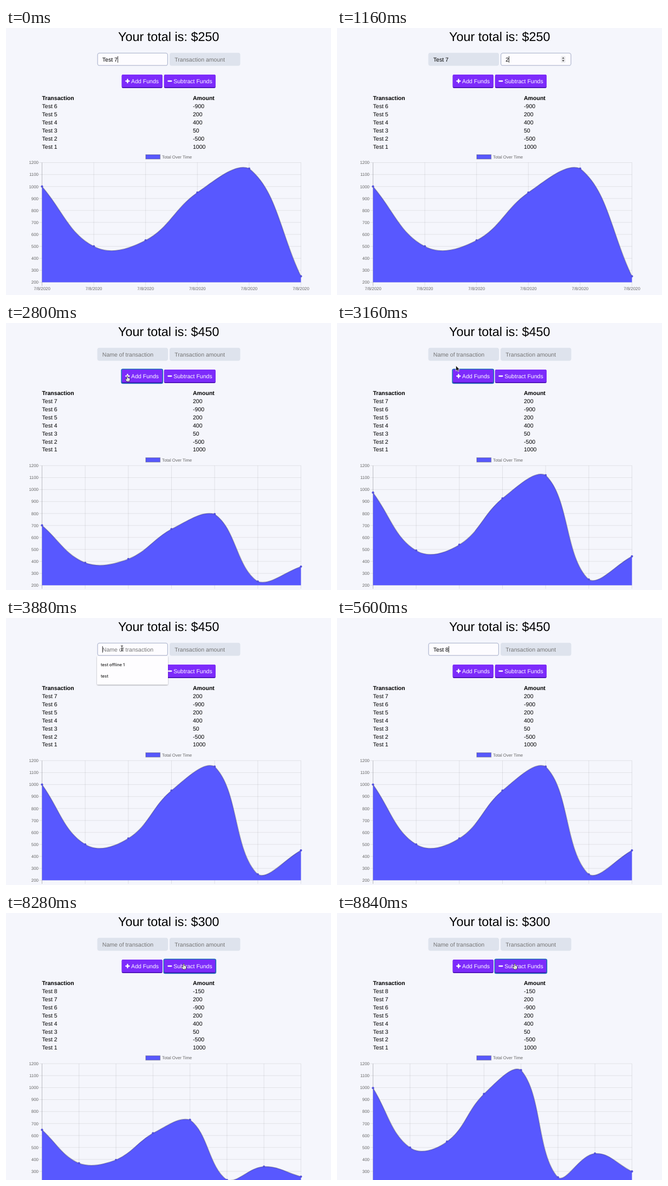
An HTML page for the animation above (8.88 s loop, 600 by 493 pixels).

```html
<!DOCTYPE html>
<html lang="en">
<head>
<meta charset="utf-8">
<title>Budget tracker</title>
<style>
  html, body { margin: 0; width: 100%; height: 100%; overflow: hidden; background: #f5f6fc; }
  svg { display: block; width: 600px; height: 493px; }
  text { font: 10.55px "Liberation Sans", Arial, sans-serif; fill: #000; white-space: pre; text-rendering: geometricPrecision; }
  .title { font-size: 23.4px; }
  .bold { font-weight: bold; }
  .hint { fill: #757575; }
  .light { fill: #fff; }
  .tick { font-size: 7.9px; fill: #666; }
  .option { font: 500 7.7px Inter, sans-serif; fill: #222; }
</style>
</head>
<body>
<svg id="stage" viewBox="0 0 600 493">
  <defs>
    <filter id="shadow" x="-10%" y="-15%" width="120%" height="140%">
      <feDropShadow dx="0" dy="1" stdDeviation="1.3" flood-opacity=".35"/>
    </filter>
  </defs>
  <g id="scene"></g>
</svg>
<script>
const LOOP = 8880;
const ROW = 14.85;
const PLOT = { left: 66.5, right: 544.5, top: 248.5, height: 221 };
const BLUE = '#5858ff';
const EDGE = 'rgba(50,50,50,.27)';
const amounts = [1000, -500, 50, 400, 200, -900, 200, -150];

// time, focused control, name text, amount text
const inputs = [
  [0, 'name', 'Test 7', ''], [220, 'amount', 'Test 7', ''],
  [920, 'amount', 'Test 7', '2'], [1320, 'amount', 'Test 7', '20'],
  [1520, 'amount', 'Test 7', '200'], [2560, 'add', '', ''],
  [3640, 'name', '', ''], [4240, 'name', 'T', ''],
  [4400, 'name', 'Te', ''], [4520, 'name', 'Tes', ''],
  [4680, 'name', 'Test', ''], [4840, 'name', 'Test ', ''],
  [5280, 'name', 'Test 8', ''], [5960, 'amount', 'Test 8', ''],
  [6600, 'amount', 'Test 8', '1'], [6800, 'amount', 'Test 8', '15'],
  [6980, 'amount', 'Test 8', '150'], [8070, 'subtract', '', '']
];

// time, number of transactions, start of chart growth
const ledgers = [[0, 6, -2000], [2560, 7, 2583], [8070, 8, 8096]];

// time, x, y
const pointerTracks = [
  { until: 4240, stops: [[1920, 214, 56], [2280, 224, 97.5], [2880, 224, 97.5], [3480, 214, 56]] },
  { until: LOOP, stops: [[7480, 214, 56], [7960, 328, 93.5]] }
];

const scene = document.getElementById('scene');
const pen = document.createElement('canvas').getContext('2d');
pen.font = '10.55px "Liberation Sans", Arial, sans-serif';

const latest = (list, t) => list.filter(item => item[0] <= t).pop();
const mix = (a, b, k) => a + (b - a) * k;
const clamp = (v, lo, hi) => Math.min(hi, Math.max(lo, v));

const text = (x, y, str, cls = '', anchor = 'start') =>
  `<text x="${x}" y="${y}" class="${cls}" text-anchor="${anchor}">${str}</text>`;
const rect = (x, y, w, h, fill, extra = '') =>
  `<rect x="${x}" y="${y}" width="${w}" height="${h}" fill="${fill}" ${extra}/>`;
const path = (d, fill, extra = '') => `<path d="${d}" fill="${fill}" ${extra}/>`;

function field(x, value, hint, focused, caretOn) {
  const start = x + 9.3;
  let out = focused
    ? rect(x + .6, 46.4, 129.3, 22.8, '#fdfcff', 'rx="3.5" stroke="#b4bbd2" stroke-width="1.3"')
    : rect(x, 45.8, 130.5, 24, '#dee3ed', 'rx="4"');
  out += text(start, 61.5, value || hint, value ? '' : 'hint');
  if (focused && caretOn)
    out += rect(start + pen.measureText(value).width, 52, .8, 12, '#000');
  return out;
}

function spinner() {
  return rect(413.5, 51.8, 8.2, 12.2, '#e9e9ec', 'rx="1.6"') +
    path('M415.5 56.6l2.1-2.7 2.1 2.7zM415.5 59.3l2.1 2.7 2.1-2.7z', '#444');
}

function button(x, width, label, focused, icon) {
  const ring = focused
    ? rect(x - .6, 85.3, width + 1.2, 26.2, 'none', 'rx="2.5" stroke="#1668b8" stroke-width="1.5"') : '';
  return rect(x, 86, width, 25, '#4a12b4', 'rx="2.5"') +
    rect(x, 86, width, 23.3, '#7d2bfb', 'rx="2.5"') + ring +
    path(icon, 'none', 'stroke="#fff" stroke-width="2.3" stroke-linecap="round"') +
    text(x + 17.4, 102, label, 'light');
}

function dropdown(typed) {
  const options = ['test offline 1', 'test'].filter(o => o.startsWith(typed.toLowerCase()));
  if (!options.length) return '';
  return rect(168, 70, 131, 10.6 + 21.2 * options.length, '#fefdff', 'rx="2" filter="url(#shadow)"') +
    options.map((o, i) => text(175, 89 + 21.2 * i, o, 'option')).join('');
}

function table(count) {
  let out = text(66.5, 133.4, 'Transaction', 'bold') + text(345, 133.4, 'Amount', 'bold');
  for (let i = 0; i < count; i++) {
    const y = 133.4 + ROW * (count - i);
    out += text(66.5, y, `Test ${i + 1}`) + text(345, y, amounts[i]);
  }
  return out;
}

// Control points of a cardinal spline with tension 0.4, kept inside the plot
function controls(points, top, base) {
  return points.map((p, i) => {
    const a = points[i - 1] || p, b = points[i + 1] || p;
    const before = Math.hypot(p.x - a.x, p.y - a.y);
    const after = Math.hypot(b.x - p.x, b.y - p.y);
    const handle = k => ({
      x: clamp(p.x + k * (b.x - a.x), PLOT.left, PLOT.right),
      y: clamp(p.y + k * (b.y - a.y), top, base)
    });
    const unit = .4 / (before + after);
    return [handle(-unit * before), handle(unit * after)];
  });
}

function chart(count, grown) {
  const top = PLOT.top + ROW * (count - 6), base = top + PLOT.height;
  const step = (PLOT.right - PLOT.left) / (count - 1);
  let total = 0, grid = '', labels = '';

  for (let v = 200; v <= 1200; v += 100) {
    const y = base - (v - 200) / 1000 * PLOT.height;
    grid += `M${PLOT.left - 6.5} ${y}H${PLOT.right}`;
    labels += text(60, y + 2.8, v, 'tick', 'end');
  }
  const final = amounts.slice(0, count).map((amount, i) => {
    total += amount;
    const x = PLOT.left + step * i;
    grid += `M${x} ${top}V${base + 6.5}`;
    labels += text(x, base + 14.2, '7/8/2020', 'tick', 'middle');
    return { x, y: base - (total - 200) / 1000 * PLOT.height };
  });

  const flat = final.map(p => ({ x: p.x, y: base }));
  const blend = (a, b) => ({ x: mix(a.x, b.x, grown), y: mix(a.y, b.y, grown) });
  const points = final.map((p, i) => blend(flat[i], p));
  const from = controls(flat, top, base), to = controls(final, top, base);
  const handles = to.map((pair, i) => pair.map((h, j) => blend(from[i][j], h)));

  const at = p => `${p.x.toFixed(2)} ${p.y.toFixed(2)}`;
  const curve = points.map((p, i) => i
    ? `C${at(handles[i - 1][1])} ${at(handles[i][0])} ${at(p)}` : `M${at(p)}`).join('');

  return rect(258, top - 14.6, 26.5, 8, BLUE, `stroke="${EDGE}" stroke-width="1.6"`) +
    text(288, top - 7.8, 'Total Over Time', 'tick') +
    path(grid, 'none', 'stroke="rgba(0,0,0,.11)" stroke-width=".8"') +
    path(`M${PLOT.left} ${top}V${base + 6.5}`, 'none', 'stroke="rgba(0,0,0,.2)" stroke-width=".8"') +
    labels +
    path(`${curve}V${base}H${PLOT.left}Z`, BLUE) +
    path(curve, 'none', `stroke="${EDGE}" stroke-width="1.8"`) +
    points.map(p => `<circle cx="${p.x}" cy="${p.y}" r="2.1" fill="#5351dc"/>`).join('');
}

function pointer(t) {
  const track = pointerTracks.find(k => t >= k.stops[0][0] && t < k.until);
  if (!track) return '';
  const a = latest(track.stops, t);
  const b = track.stops[track.stops.indexOf(a) + 1] || a;
  const k = b === a ? 0 : (t - a[0]) / (b[0] - a[0]);
  const ease = k * k * (3 - 2 * k);
  const x = mix(a[1], b[1], ease), y = mix(a[2], b[2], ease);
  const outline = 'stroke="#222" stroke-width=".8" stroke-linejoin="round"';
  let shape;
  if (y < 70)
    shape = path('M-2-5Q0-5 0-3.5Q0-5 2-5M0-3.5V3.5M-2 5Q0 5 0 3.5Q0 5 2 5M-1 .8H1', 'none', 'stroke="#111" stroke-width=".9"');
  else if (y < 86)
    shape = path('M0 0V10L2.4 7.9 4 11.4 5.6 10.7 4.1 7.3H7Z', '#111', 'stroke="#fff" stroke-width=".7"');
  else
    shape = path('M-1 .8Q0-.6 1 .8V4L4.2 4.6Q5.2 5 5 6.2L4 10.5H-1.2L-3.6 6.6Q-3.8 5.3-2.5 5.6L-1 6.8Z', '#fff', outline) +
      path('M.7 7V9M2.4 7V9', 'none', 'stroke="#222" stroke-width=".5"');
  return `<g transform="translate(${x} ${y})">${shape}</g>`;
}

function draw(t) {
  const [since, focus, name, amount] = latest(inputs, t);
  const [, count, start] = latest(ledgers, t);
  const caretOn = (t - since) % 1000 < 500;
  const grown = 1 - (1 - clamp((t - start) / 1000, 0, 1)) ** 4;
  const total = amounts.slice(0, count).reduce((a, b) => a + b);

  scene.innerHTML = rect(0, 0, 600, 493, '#f5f6fc') +
    text(300.3, 24.4, `Your total is: $${total}`, 'title', 'middle') +
    field(168.5, name, 'Name of transaction', focus === 'name', caretOn) +
    field(302, amount, 'Transaction amount', focus === 'amount', caretOn) +
    (focus === 'amount' ? spinner() : '') +
    button(213.7, 75, 'Add Funds', focus === 'add', 'M221.4 98H227.4M224.4 95V101') +
    button(291.8, 95, 'Subtract Funds', focus === 'subtract', 'M299.4 98H305.4') +
    table(count) + chart(count, grown) +
    (focus === 'name' && t >= 3640 ? dropdown(name) : '') +
    pointer(t);
}

const begin = performance.now();
function tick() {
  draw((performance.now() - begin) % LOOP);
  requestAnimationFrame(tick);
}
tick();
</script>
</body>
</html>
```
